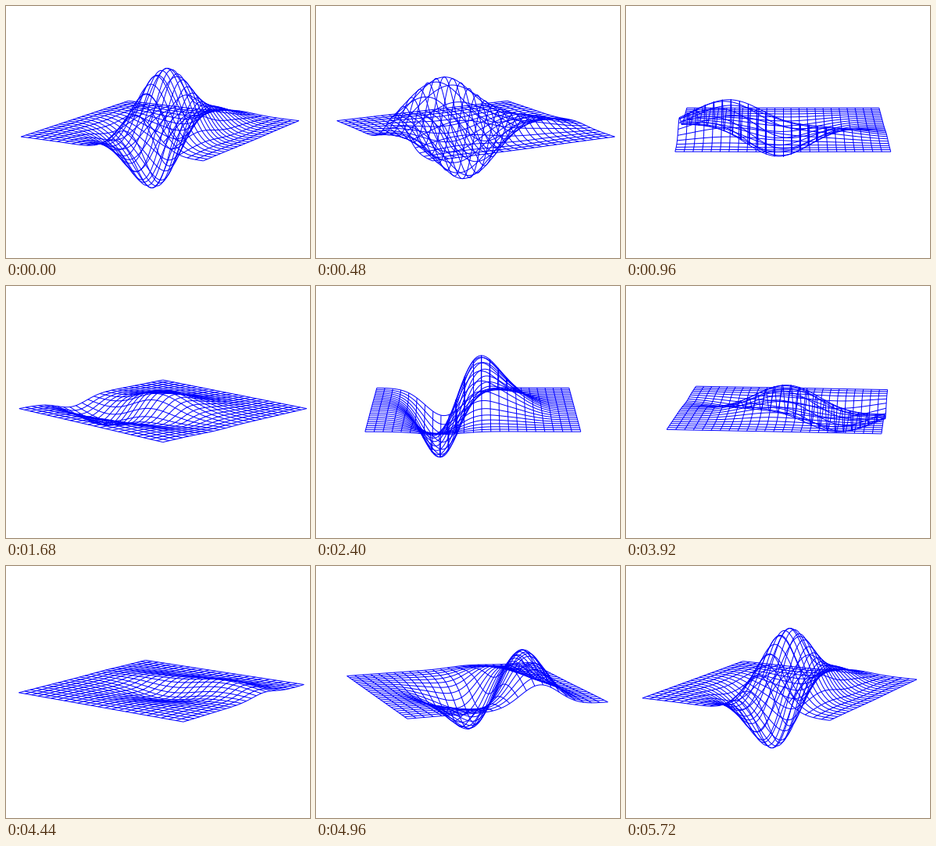
Recreate the animation shown at these times as a matplotlib script. Size 389 by 322 pixels, loop 5760 ms.

```python
import numpy as np
import matplotlib.pyplot as plt
from matplotlib.animation import FuncAnimation
from matplotlib.collections import LineCollection

W, H, DPI = 389, 322, 100
FRAMES, INTERVAL = 144, 40
CELLS, FINE = 24, 4  # mesh cells per side, curve steps per cell

# Camera: screen centre, focal length, distance and elevation
CX, CY = 200.8, 156.6
FOCAL, DIST = 2211, 17.0
SIN_E, COS_E = 0.2146, 0.9767
START = np.radians(-60)

side = np.linspace(-1, 1, CELLS * FINE + 1)
u, v = np.meshgrid(side, side)


def bump(height, u0, v0, su, sv):
    return height * np.exp(-((u - u0) / su) ** 2 / 2 - ((v - v0) / sv) ** 2 / 2)


surface = (bump(1.125, -0.27, 0.298, 0.48, 0.20)
           - bump(0.925, -0.07, 0.095, 0.33, 0.28)
           - bump(0.08, 0.10, -0.43, 0.30, 0.17))


def project(x, y, z):
    """Perspective view; y points towards the viewer."""
    scale = FOCAL / (DIST - y * COS_E - z * SIN_E)
    return np.dstack([CX + scale * x, CY + scale * (y * SIN_E - z * COS_E)])


def mesh(turn):
    a = START + turn
    x = u * np.cos(a) - v * np.sin(a)
    y = u * np.sin(a) + v * np.cos(a)
    pts = project(x, y, surface * np.cos(turn))
    return [*pts[::FINE], *pts.transpose(1, 0, 2)[::FINE]]


fig = plt.figure(figsize=(W / DPI, H / DPI), dpi=DPI, facecolor="white")
ax = fig.add_axes([0, 0, 1, 1])
ax.set(xlim=(0, W), ylim=(H, 0))
ax.axis("off")

wires = LineCollection(mesh(0), colors="#0000ff", linewidths=72 / DPI)
ax.add_collection(wires, autolim=False)


def update(i):
    wires.set_segments(mesh(2 * np.pi * i / FRAMES))
    return wires,


anim = FuncAnimation(fig, update, frames=FRAMES, interval=INTERVAL,
                     repeat=True, repeat_delay=0)
plt.show()
```
